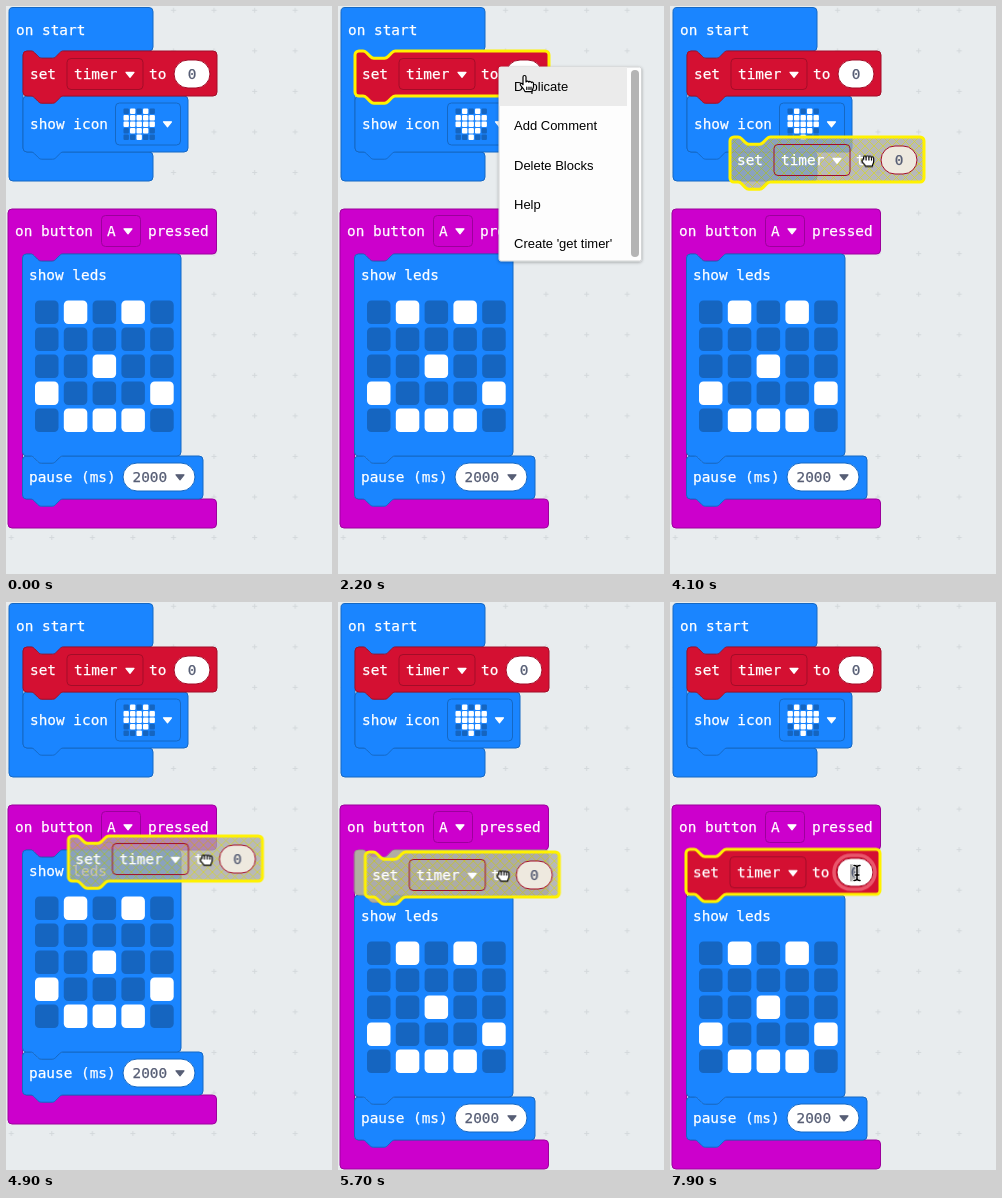
These frames come from a looping animation (326 px wide and 568 px high, 8 s). An HTML page:

```html
<!DOCTYPE html>
<html lang="en">
<head>
<meta charset="utf-8">
<title>Block editor: duplicate a block</title>
<style>
  html, body { margin: 0; width: 100%; height: 100%; overflow: hidden; background: #e8ecee; }
  svg { display: block; }
  text { font: 14.4px "DejaVu Sans Mono", monospace; fill: #fff; stroke: #fff; stroke-width: .25px; white-space: pre; }
  .value { fill: #575e75; stroke: #575e75; }
  .menu text { font: 13px "Liberation Sans", Arial, sans-serif; fill: #000; stroke: none; }
  .selected { fill: none; stroke: #fff200; stroke-width: 3; }
  .cursor path { fill: #fff; stroke: #000; stroke-width: 1.2; stroke-linejoin: round; stroke-linecap: round; }
  .cursor .line { fill: none; }
</style>
</head>
<body>
<svg id="stage" width="326" height="568" viewBox="0 0 326 568"></svg>
<script>
const LOOP = 8000;
const BLUE = ['#1a85ff', '#1568c4'], RED = ['#d41032', '#a30d28'], PINK = ['#cc00cc', '#9c009c'];
const LED_OFF = '#1565c0';
const GAP = 45;

// Connector between blocks, drawn rightwards and leftwards
const NOTCH = 'c1.8 0 2.7 .9 3.6 1.8l3.6 3.6c.9 .9 1.8 1.8 3.6 1.8h10.8c1.8 0 2.7 -.9 3.6 -1.8l3.6 -3.6c.9 -.9 1.8 -1.8 3.6 -1.8';
const TAB = 'c-1.8 0 -2.7 .9 -3.6 1.8l-3.6 3.6c-.9 .9 -1.8 1.8 -3.6 1.8h-10.8c-1.8 0 -2.7 -.9 -3.6 -1.8l-3.6 -3.6c-.9 -.9 -1.8 -1.8 -3.6 -1.8';
const arc = (dx, dy, sweep = 1) => `a4 4 0 0 ${sweep} ${dx} ${dy}`;

const stackPath = (x, y, w, h) =>
  `M${x} ${y + 4}${arc(4, -4)}h4${NOTCH}H${x + w - 4}${arc(4, 4)}V${y + h - 4}${arc(-4, 4)}` +
  `H${x + 40.4}${TAB}H${x + 4}${arc(-4, -4)}z`;

const hatPath = (x, y, w, h, inner, top, bottom) =>
  `M${x} ${y + 4}${arc(4, -4)}H${x + w - 4}${arc(4, 4)}V${top - 4}${arc(-4, 4)}H${inner + 40.4}${TAB}` +
  `H${inner + 4}${arc(-4, 4, 0)}V${bottom - 4}${arc(4, 4, 0)}H${x + w - 4}${arc(4, 4)}` +
  `V${y + h - 4}${arc(-4, 4)}H${x + 4}${arc(-4, -4)}z`;

const shape = (d, [fill, stroke]) => `<path d="${d}" fill="${fill}" stroke="${stroke}"/>`;
const group = (id, body, attrs = '') => `<g id="${id}" ${attrs}>${body}</g>`;
const label = (x, y, s, cls = '') => `<text x="${x}" y="${y}" class="${cls}">${s}</text>`;
const rect = (x, y, w, h, r, fill, stroke = 'none') =>
  `<rect x="${x}" y="${y}" width="${w}" height="${h}" rx="${r}" fill="${fill}" stroke="${stroke}"/>`;
const caret = (x, y, fill = '#fff') =>
  `<path d="M${x - 4} ${y - 2.2}h8l-4 5z" fill="${fill}" stroke="${fill}" stroke-width="1.2" stroke-linejoin="round"/>`;

function leds(rows, x, y, dx, dy, size, r) {
  return rows.map((row, j) => [...row].map((c, i) =>
    rect(x + i * dx, y + j * dy, size, size, r, c === '#' ? '#fff' : LED_OFF)).join('')).join('');
}

const SET_PATH = stackPath(0, 0, 194, 45);
const setParts = (oval = '#fff') =>
  label(7, 28, 'set') + rect(44, 7.5, 76, 31, 4, 'none', RED[1]) + label(51, 28, 'timer') +
  caret(107, 23.5) + label(126, 28, 'to') + rect(151, 9, 36, 28, 14, oval, RED[1]) +
  label(164.7, 28, '0', 'value');
const setBlock = () => shape(SET_PATH, RED) + setParts();
const outline = `<path class="selected" d="${SET_PATH}"/>`;

const startBlocks =
  shape(hatPath(3, 1.5, 144, 173.5, 17, 45, 146), BLUE) + label(10, 29, 'on start') +
  shape(stackPath(17, 90, 165, 56), BLUE) + label(24, 123, 'show icon') +
  rect(109.5, 97, 65, 42, 4, 'none', BLUE[1]) +
  leds(['.#.#.', '#####', '#####', '.###.', '..#..'], 117.5, 102.5, 6.5, 6.5, 5.4, 1) + caret(161.5, 118) +
  group('source', setBlock() + group('sourceOutline', outline), 'transform="translate(17 45)"');

const buttonHat = extra => shape(hatPath(2, 203, 208.5, 319 + extra, 16.5, 248, 493 + extra), PINK);
const buttonHead = label(9, 230, 'on button') + rect(95.5, 209.5, 39, 31, 4, 'none', PINK[1]) +
  label(101, 230, 'A') + caret(122, 225) + label(142, 230, 'pressed');

const lowerBlocks =
  shape(stackPath(16.5, 450, 180.5, 43), BLUE) + label(23, 476, 'pause (ms)') +
  rect(117, 457, 72, 28, 14, '#fff', BLUE[1]) + label(126.5, 476, '2000', 'value') + caret(174, 471, '#575e75') +
  shape(stackPath(16.5, 248, 158.5, 202), BLUE) + label(23, 274, 'show leds') +
  leds(['.#.#.', '.....', '..#..', '#...#', '.###.'], 29, 294.5, 28.8, 27, 23.5, 4.5);

const focus = rect(148, 6, 41, 34, 17, 'none', '#e9566c') .replace('/>', ' stroke-width="3.5"/>') +
  rect(164, 15, 9.5, 17, 0, '#b5b5b5') + label(164.7, 28, '0', 'value');

const menuItems = ['Duplicate', 'Add Comment', 'Delete Blocks', 'Help', "Create 'get timer'"];
const menu = rect(161, 61, 142.5, 194, 2, '#fdfdfd', '#d2d4d5').replace('/>', ' filter="url(#shadow)"/>') +
  rect(161, 61, 128, 39, 0, '#ebebeb') + rect(293, 64, 8, 187, 4, '#b4b4b4') +
  menuItems.map((s, i) => label(176, 85 + i * 39.25, s)).join('');

const hand = (fingers, lines) => `<path d="${fingers}"/><path class="line" d="${lines}"/>`;
const cursors =
  group('arrow', '<path d="M-5 -8V7l3.6 -3.3 2.4 5.3 2.6 -1.2 -2.4 -5.2h4.8z" style="fill:#000;stroke:#fff"/>') +
  group('pointer', hand('M-4 -7c0 -2 3 -2 3 0v5c.4 -1.4 2.6 -1.2 2.8 .2 .5 -1.2 2.4 -.8 2.6 .5 .6 -1 2.1 -.5 2.1 .9v3c0 2 -1.5 3 -1.5 5h-7c-1 -3 -3.5 -4.5 -4.6 -6.6 -.6 -1.6 1.2 -2.3 2.6 -.3z',
    'M-.2 3v2.5M2 3v2.5M4 3v2.5')) +
  group('open', hand('M-3.5 1L-5 -4c-.4 -1.8 1.6 -2.2 2.2 -.6l.8 2.4 -.2 -4c0 -1.9 2.3 -1.9 2.5 0l.3 3.8 .8 -3.6c.4 -1.7 2.5 -1.2 2.3 .5l-.4 3.6 1 -1.9c.8 -1.4 2.4 -.6 1.9 .9 -1 3 -1.2 4.6 -2.2 6.4v3h-7c-1 -3 -3 -4.3 -4 -6 -.7 -1.7 1.3 -2 2.5 -.5z', 'M-1.8 -1v1M.6 -1v1M3 -1v1')) +
  group('closed', hand('M-4.5 -3c.2 -1.8 2.3 -1.8 2.6 -.4 .4 -1.5 2.5 -1.5 2.8 0 .4 -1.2 2.4 -1 2.6 .4 .6 -1 2.2 -.5 2.2 1V1c0 2 -1.2 2.6 -1.3 4.6h-7C-3 3.5 -6 2.5 -6 .4c0 -1.5 1 -1.8 1.8 -1.5z', 'M-1.9 -2.6v2M.9 -2.6v2M3.5 -2.2v1.8')) +
  group('beam', '<path class="line" d="M-3 -7.5q3 0 3 2V5.5q0 2 -3 2M3 -7.5q-3 0 -3 2M0 5.5q0 2 3 2M-2 2h4" style="stroke:#fff;stroke-width:3"/>' +
    '<path class="line" d="M-3 -7.5q3 0 3 2V5.5q0 2 -3 2M3 -7.5q-3 0 -3 2M0 5.5q0 2 3 2M-2 2h4" style="stroke-width:1.5"/>');

const stage = document.getElementById('stage');
stage.innerHTML = `<defs>
  <pattern id="grid" width="40.56" height="40.56" x="-15.2" y="-16" patternUnits="userSpaceOnUse">
    <path d="M18 20.3h5M20.5 17.8v5" stroke="#d3d8db"/></pattern>
  <pattern id="hatch" width="9" height="9" patternUnits="userSpaceOnUse">
    <path d="M0 0h9v9H0z" fill="#aaa"/><path d="M0 0L9 9M9 0L0 9" stroke="#cc0" stroke-width=".8"/></pattern>
  <filter id="shadow" x="-10%" y="-10%" width="120%" height="120%">
    <feDropShadow dx="0" dy="1" stdDeviation="1.5" flood-opacity=".3"/></filter></defs>` +
  rect(0, 0, 326, 568, 0, '#e8ecee') + rect(0, 0, 326, 568, 0, 'url(#grid)') + startBlocks +
  group('hatShort', buttonHat(0)) + group('hatTall', buttonHat(GAP)) + buttonHead +
  group('lower', lowerBlocks) +
  group('marker', shape(SET_PATH, ['#b1ada2', '#a19d92']), 'transform="translate(16.5 248)"') +
  group('dropped', setBlock() + outline + group('focus', focus), 'transform="translate(16 247.3)"') +
  group('copy', `<path d="${SET_PATH}" fill="url(#hatch)" fill-opacity=".78"/>` + setParts('#eee9df') + outline) +
  group('menu', menu, 'class="menu"') +
  group('cursor', cursors, 'class="cursor"');

const $ = id => document.getElementById(id);
const play = (id, frames) => $(id).animate(frames, { duration: LOOP, iterations: Infinity });

// Visible only within the listed [from, to] spans
function show(id, ...spans) {
  const frames = [{ offset: 0, opacity: spans[0][0] ? 0 : 1 }];
  for (const [from, to] of spans) {
    if (from) frames.push({ offset: from / LOOP, opacity: 1 });
    if (to < LOOP) frames.push({ offset: to / LOOP, opacity: 0 });
  }
  frames.push({ offset: 1, opacity: frames.at(-1).opacity });
  play(id, frames.map(f => ({ ...f, easing: 'step-end' })));
}

function move(id, steps, easing = 'ease-in-out') {
  play(id, steps.map(([t, x, y]) => ({ offset: t / LOOP, transform: `translate(${x}px, ${y}px)`, easing })));
}

const CLICK = 2500, GRAB = 3900, INSERT = 5200, DROP = 6000, EDIT = 7100;

show('sourceOutline', [900, CLICK]);
show('menu', [1000, CLICK]);
show('copy', [CLICK, DROP]);
show('hatShort', [0, INSERT]);
show('hatTall', [INSERT, LOOP]);
show('marker', [INSERT, DROP]);
show('dropped', [DROP, LOOP]);
show('focus', [EDIT, LOOP]);
move('lower', [[0, 0, 0], [INSERT, 0, GAP], [LOOP, 0, GAP]], 'step-end');

show('arrow', [250, 600]);
show('pointer', [1000, CLICK]);
show('open', [600, 1000], [3300, GRAB], [DROP, 6600]);
show('beam', [CLICK, 3300], [6600, LOOP]);
show('closed', [GRAB, DROP]);

const drag = [[4200, 60, 131], [4600, 74, 190], [4750, 75, 216], [4900, 62.5, 234], [5400, 30, 249], [5700, 27.3, 250]];
const grip = ([t, x, y]) => [t, x + 138, y + 23.5];
move('copy', [[0, 60, 131], ...drag, [LOOP, 27.3, 250]], 'linear');
move('cursor', [
  [0, 300, 130], [250, 300, 130], [850, 161, 64], [1100, 161, 64], [1700, 189, 78], [2600, 189, 78],
  [3000, 190, 75], [3150, 190, 75], [3700, 198, 154.5], ...drag.map(grip),
  [6200, 166, 273.5], [6800, 187, 271], [LOOP, 187, 271]
], 'linear');
</script>
</body>
</html>
```
